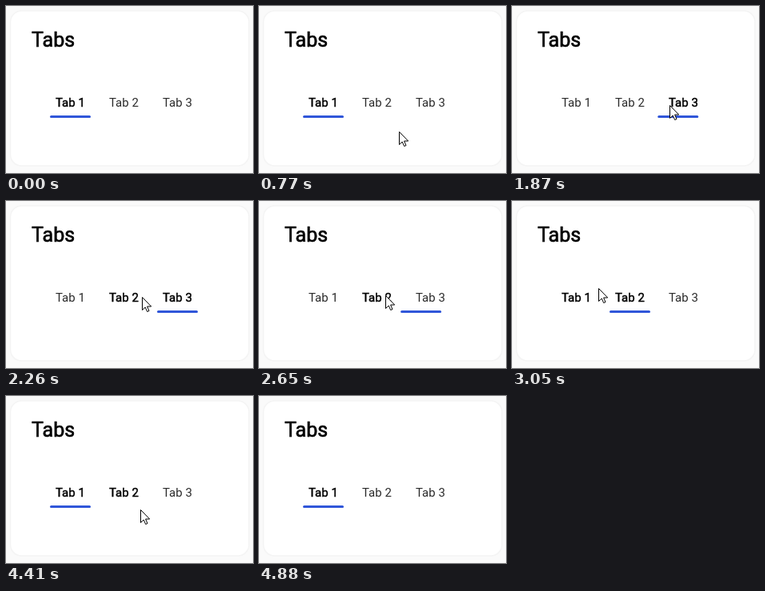
Animation, 309 px wide and 209 px high, one loop 5910 ms. Source, as an HTML page:

```html
<!DOCTYPE html>
<html lang="en">
<head>
<meta charset="utf-8">
<title>Tabs</title>
<style>
  html, body { margin: 0; width: 100%; height: 100%; overflow: hidden; background: #fafafa; }
  svg { display: block; width: 309px; height: 209px; }
  text { font-family: Roboto, Arial, sans-serif; }
  .title { font-size: 25px; fill: #000; stroke: #000; stroke-width: .65px; }
  .tab { font-size: 15px; fill: #2a2a2a; }
  .tab.strong { fill: #000; stroke: #000; stroke-width: .45px; }
</style>
</head>
<body>
<svg viewBox="0 0 309 209">
  <rect x="5.5" y="6" width="298.5" height="194" rx="14" fill="#fff" stroke="#f4f4f4" stroke-width="1.5"/>
  <text class="title" x="32" y="51">Tabs</text>
  <text class="tab" x="62" y="126">Tab 1</text>
  <text class="tab" x="129" y="126">Tab 2</text>
  <text class="tab" x="196" y="126">Tab 3</text>
  <rect id="bar" y="137" width="51" height="3" rx="1.5" fill="#3056d9"/>
  <path id="cursor" d="M.5.5V16.5L4.2 13L6.7 18.5L9 17.5L6.6 12H11.7Z" fill="#fff" stroke="#000"/>
</svg>
<script>
const LOOP = 5910, STEP = 79, PHASE = 45, LEAD = 14;
const SHOW = 610, HIDE = 4880;
const PITCH = 67, TAB_X = 47, BAR_X = 55, SLIDE = 250;

// The pointer enters from below, visits the tabs and leaves at the corner
const entry = { x: 190, y: 177 };
const moves = [
  { at: 610, span: 390, x: 150, y: 122 },
  { at: 1310, span: 80, x: 197, y: 124 },
  { at: 2030, span: 380, x: 158, y: 118 },
  { at: 2700, span: 350, x: 108, y: 109 },
  { at: 3070, span: 220, x: 83, y: 108 },
  { at: 3810, span: 590, x: 168, y: 142 },
  { at: 4410, span: 390, x: 276, y: 196 }
];
const clicks = [1710, 2570, 3290];

const tabs = document.querySelectorAll('.tab');
const bar = document.getElementById('bar');
const cursor = document.getElementById('cursor');

const mix = (a, b, k) => a + (b - a) * k;

function ease(k) {
  k = Math.min(1, Math.max(0, k));
  return k * k * (3 - 2 * k);
}

// Motion advances in even steps, like a screen recording
const stepped = t => Math.floor((t - PHASE) / STEP) * STEP + PHASE + LEAD;

function pointer(t) {
  return moves.reduce((p, m) => {
    const k = ease((t - m.at) / m.span);
    return { x: mix(p.x, m.x, k), y: mix(p.y, m.y, k) };
  }, entry);
}

function tabAt({ x, y }) {
  return y > 97 && y < 145 ? Math.floor((x - TAB_X) / PITCH) : -1;
}

function selection(t) {
  let active = 0, pos = 0;
  for (const at of clicks.filter(c => c <= t)) {
    const tab = tabAt(pointer(at));
    pos = mix(active, tab, ease((t - at + 50) / SLIDE));
    active = tab;
  }
  return { active, pos };
}

function draw(time) {
  const t = stepped(time);
  const visible = time >= SHOW && time < HIDE;
  const p = pointer(t);
  const hover = visible ? tabAt(p) : -1;
  const { active, pos } = selection(t);

  tabs.forEach((tab, i) => tab.classList.toggle('strong', i === active || i === hover));
  bar.setAttribute('x', BAR_X + pos * PITCH);
  cursor.setAttribute('transform', `translate(${Math.round(p.x)} ${Math.round(p.y)})`);
  cursor.style.display = visible ? '' : 'none';
}

const origin = performance.now();
function frame() {
  draw((performance.now() - origin) % LOOP);
  requestAnimationFrame(frame);
}
frame();
</script>
</body>
</html>
```
